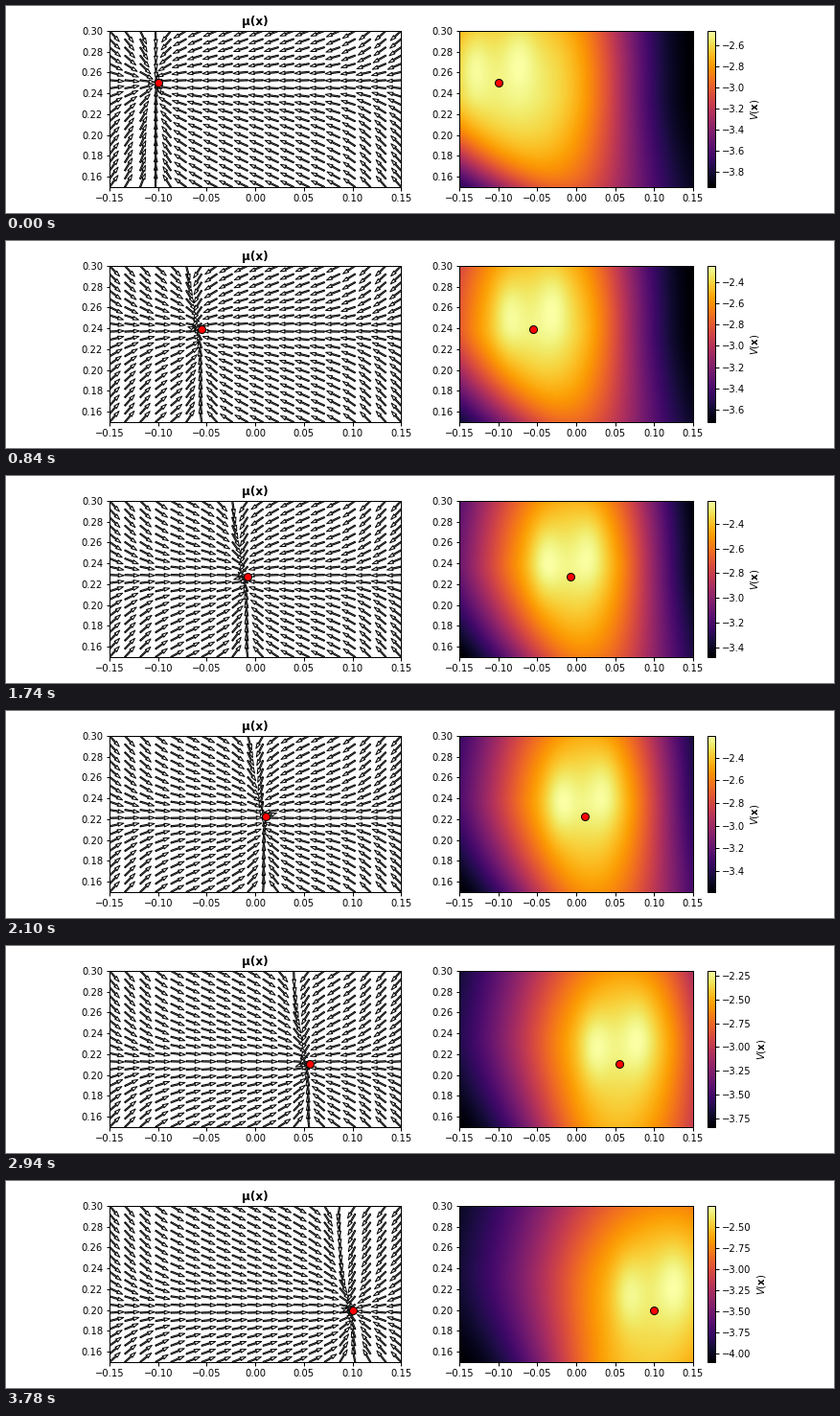
A matplotlib script for the animation above (3.84 s loop, 864 by 216 pixels).

```python
import numpy as np
import matplotlib.pyplot as plt
from matplotlib.animation import FuncAnimation

FRAMES, INTERVAL = 64, 60
X0, X1, Y0, Y1 = -0.15, 0.15, 0.15, 0.30


def goal(i):
    w = i / (FRAMES - 1)
    return -0.1 + 0.2 * w, 0.25 - 0.05 * w


def limits(i):
    """Lowest and highest value on the colour bar."""
    return (np.interp(i, [0, 29, 63], [-3.946, -3.476, -4.10]),
            np.interp(i, [0, 14, 40, 49, 63],
                      [-2.458, -2.245, -2.197, -2.197, -2.255]))


def sigmoid(z):
    return 1 / (1 + np.exp(-z))


def mix(a, b, w):
    return a + (b - a) * w


def bump(cx, cy):
    return np.exp(-((fx - cx) / 0.014) ** 2 / 2 - ((fy - cy) / 0.025) ** 2 / 2)


def surface(i):
    """A plateau around the goal with two soft flanks and two crests."""
    gx, gy = goal(i)
    low = np.clip((0.24 - fy) / 0.09, 0, 1) ** 1.5

    # Middle and spread of each flank; both change towards the lower edge.
    lx = mix(-0.113 + 0.95 * gx - 2 * gx ** 2, -0.065 + 0.35 * gx, low)
    ls = mix(0.048 + 0.12 * gx, 0.04, low)
    rx = 0.096 + 0.85 * gx + 4.6 * gx ** 2 + 0.005 * low
    rs = mix(0.033, 0.045, low)

    u = sigmoid((fx - lx) / ls) * sigmoid((rx - fx) / rs)
    u *= (1 - 0.1 * low) * np.exp(-(np.maximum(fy - gy, 0) / 0.2) ** 2)
    u += 0.07 * bump(gx - 0.033, gy + 0.015)
    u += 0.05 * bump(gx + 0.027, gy + 0.025)
    u = (u - u.min()) / (u.max() - u.min())
    return mix(*limits(i), u)


def policy(i):
    """Unit headings towards the goal, with saturating components."""
    gx, gy = goal(i)
    lean = 0.15 * min(i / 10, 1)
    column = gx - 0.002 - lean * np.maximum(qy - gy, 0)
    border = np.clip((np.abs(qx) - 0.065) / 0.065, 0, 1)
    u = np.tanh((column - qx) / 0.04)
    u *= 1 - 0.58 * border ** 2 * (3 - 2 * border)
    v = 0.5 * np.tanh((gy - qy) / 0.05)
    r = np.hypot(u, v) + 1e-9
    return u / r, v / r


qx, qy = np.meshgrid(np.linspace(X0, X1, 20), np.linspace(Y0, Y1, 20))
fx, fy = np.meshgrid(np.linspace(X0, X1, 122), np.linspace(Y0, Y1, 82))

plt.rcParams.update({"axes.linewidth": 1, "xtick.major.width": 1,
                     "ytick.major.width": 1})
fig, (left, right) = plt.subplots(1, 2, figsize=(12, 3), dpi=72)
fig.subplots_adjust(left=0.125, right=0.9, bottom=0.125, top=0.88, wspace=0.2)

left.set_title("μ(x)", fontsize=12, fontweight="bold")
arrows = left.quiver(qx, qy, *policy(0), scale=20, scale_units="width",
                     width=0.004, facecolor="white", edgecolor="black",
                     linewidth=1)

lo, hi = limits(0)
image = right.imshow(surface(0), extent=(X0, X1, Y0, Y1), origin="lower",
                     aspect="auto", cmap="inferno", interpolation="bilinear",
                     vmin=lo, vmax=hi)
bar = fig.colorbar(image, ax=right)
bar.set_label(r"$V(\mathbf{x})$")

dots = []
for ax in (left, right):
    dots += ax.plot([], [], "o", color="red", markersize=8,
                    markeredgecolor="black", markeredgewidth=1, zorder=5)
    ax.set_xticks(np.arange(-3, 4) * 0.05)
    ax.set_yticks(np.arange(8, 16) * 0.02)
    ax.set_xlim(X0, X1)
    ax.set_ylim(Y0, Y1)


def update(i):
    arrows.set_UVC(*policy(i))
    image.set_data(surface(i))
    image.set_clim(*limits(i))
    gx, gy = goal(i)
    for dot in dots:
        dot.set_data([gx], [gy])
    return [arrows, image, *dots]


anim = FuncAnimation(fig, update, frames=FRAMES, interval=INTERVAL,
                     repeat=True, repeat_delay=0, blit=False)
plt.show()
```
